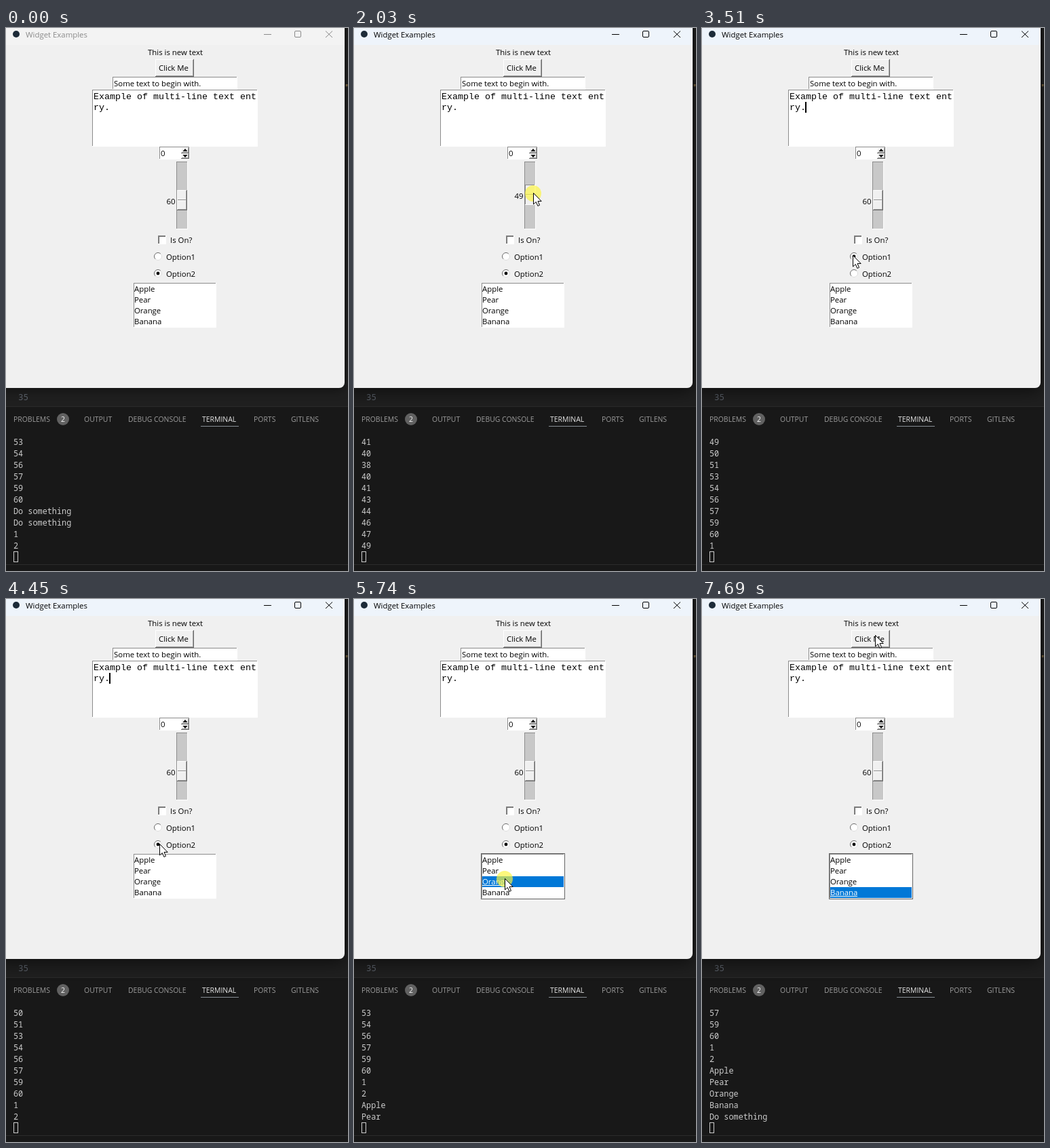
An HTML page with a canvas for the animation above (8 s loop, 504 by 801 pixels).

```html
<!DOCTYPE html>
<html lang="en">
<head>
<meta charset="utf-8">
<title>Widget Examples</title>
<style>
html, body { margin: 0; width: 504px; height: 801px; overflow: hidden; background: #181818; }
canvas { display: block; }
</style>
</head>
<body>
<canvas id="stage" width="504" height="801"></canvas>
<script>
const ctx = document.getElementById('stage').getContext('2d');
const LOOP = 8000;
const UI = '"Open Sans", "Noto Sans", sans-serif';
const MONO = '"Noto Sans Mono", monospace';
const COURIER = '"Liberation Mono", monospace';
const FRUIT = ['Apple', 'Pear', 'Orange', 'Banana'];

const T = { enter: 140, focus: 1100, caret: 1160, drop: 2640, opt1: 3340, opt2: 4320, button: 7560 };
const PICKS = [4870, 5320, 5740, 6070];

// [start, end] of each mouse press
const PRESSES = [[1040, T.drop], [3300, 3430], [T.opt2, 4440], [T.button, 7680],
  ...PICKS.map(p => [p, p + 80])];

// [time, x, y] of the pointer tip
const PATH = [
  [140, 453, 740], [400, 350, 440], [640, 217, 112], [880, 248, 222], [1090, 259, 250],
  [1160, 259, 247], [1500, 262, 235], [1720, 262, 235], [2030, 264, 243], [2570, 266, 250],
  [2700, 264, 252], [3300, 224, 335], [3510, 222, 335], [4190, 226, 354], [4320, 226, 354],
  [4660, 225, 372], [4800, 222, 378], [4940, 221, 382], [5260, 218, 398], [5600, 220, 405],
  [5740, 222, 412], [6070, 226, 427], [6480, 226, 427], [6560, 213, 438], [6900, 272, 230],
  [7230, 256, 55], [7290, 255, 53]
];

// slider travel in pixels above its lowest point
const DRAG = [[1100, 15], [1160, 12], [1500, 0], [1720, 0], [2030, 7], [2570, 15]];

const sliderValue = k => Math.round(38.4 + k * 100 / 69);

function track(keys, t, i = 1) {
  if (t <= keys[0][0]) return keys[0][i];
  for (let n = 1; n < keys.length; n++) {
    const a = keys[n - 1], b = keys[n];
    if (t <= b[0]) return a[i] + (b[i] - a[i]) * (t - a[0]) / (b[0] - a[0]);
  }
  return keys[keys.length - 1][i];
}

const log = ['53', '54', '56', '57', '59', '60', 'Do something', 'Do something', '1', '2']
  .map(s => [-1, s]);
log.push([1150, '59']);
for (let k = 13; k >= 0; k--) log.push([1230 + (13 - k) * 20, sliderValue(k)]);
for (let k = 1; k <= 15; k++) log.push([k <= 7 ? 1720 + 43 * k : 2030 + 67 * (k - 7), sliderValue(k)]);
log.push([T.opt1 + 20, '1'], [T.opt2 + 60, '2']);
PICKS.forEach((p, i) => log.push([p + 60, FRUIT[i]]));
log.push([7680, 'Do something']);

function rect(x, y, w, h, c) {
  ctx.fillStyle = c;
  ctx.fillRect(x, y, w, h);
}

function text(s, x, y, c = '#000', size = 11.4, face = UI, align = 'left') {
  ctx.font = size + 'px ' + face;
  ctx.textAlign = align;
  ctx.fillStyle = c;
  ctx.fillText(s, x, y);
}

function line(points, c, w = 1) {
  ctx.beginPath();
  points.forEach(([x, y]) => ctx.lineTo(x, y));
  ctx.strokeStyle = c;
  ctx.lineWidth = w;
  ctx.stroke();
}

function poly(points, c) {
  ctx.beginPath();
  points.forEach(([x, y]) => ctx.lineTo(x, y));
  ctx.closePath();
  ctx.fillStyle = c;
  ctx.fill();
}

function disc(x, y, r, c) {
  ctx.beginPath();
  ctx.arc(x, y, r, 0, Math.PI * 2);
  ctx.fillStyle = c;
  ctx.fill();
}

function bevel(x, y, w, h, light, dark, fill) {
  rect(x, y, w, h, dark);
  rect(x, y, w - 1, h - 1, light);
  rect(x + 1, y + 1, w - 2, h - 2, fill);
}

const sunken = (x, y, w, h, fill = '#fff') => bevel(x, y, w, h, '#8c8c8c', '#fff', fill);

function raised(x, y, w, h) {
  bevel(x, y, w, h, '#fff', '#696969', '#a0a0a0');
  rect(x + 1, y + 1, w - 3, h - 3, '#f0f0f0');
}

function editor() {
  rect(0, 0, 504, 801, '#181818');
  rect(0, 0, 504, 558, '#1f1f1f');
  text('"', 499, 92, '#c9a15a', 12.6, MONO);
  text('35', 18, 549, '#5b616a', 12.6, MONO);
  rect(0, 558, 504, 1, '#2b2b2b');
  rect(0, 791, 504, 1, '#2b2b2b');

  const tab = (s, x, c = '#9d9d9d') => text(s, x, 581, c, 10.45);
  tab('PROBLEMS', 11);
  disc(84, 577, 9, '#616161');
  text('2', 84, 581, '#f8f8f8', 10.5, UI, 'center');
  tab('OUTPUT', 115);
  tab('DEBUG CONSOLE', 180);
  tab('TERMINAL', 289, '#e7e7e7');
  rect(287, 587, 56, 1, '#868d94');
  tab('PORTS', 365);
  tab('GITLENS', 420);
}

function terminal(t) {
  const put = (s, row) => text(s, 11, 615 + row * 17, '#cccccc', 11.85, MONO);
  let shown = log.filter(e => e[0] <= t);
  // the first new line sits on the prompt row before the view scrolls
  const held = t >= 1150 && t < 1230;
  if (held) {
    put('59', 10);
    shown = shown.slice(0, -1);
  }
  shown.slice(-10).forEach((e, i) => put(e[1], i));
  ctx.strokeStyle = '#cccccc';
  ctx.lineWidth = 1;
  ctx.strokeRect(11.5, 772.5, 6, 15);
}

function frame(active) {
  ctx.save();
  ctx.shadowColor = active ? 'rgba(0,0,0,.6)' : 'rgba(0,0,0,.4)';
  ctx.shadowBlur = active ? 24 : 14;
  ctx.shadowOffsetY = 4;
  ctx.beginPath();
  ctx.roundRect(-20, -20, 519, 551, 8);
  ctx.fillStyle = '#f0f0f0';
  ctx.fill();
  ctx.restore();
  rect(0, 0, 499, 25, active ? '#eef4fb' : '#f3f3f3');
  disc(15, 9, 5, '#1d2b38');
  const ink = active ? '#000' : '#8a8a8a';
  text('Widget Examples', 29, 14, ink);
  rect(380, 9, 11, 1, ink);
  ctx.beginPath();
  ctx.roundRect(425.5, 4.5, 9, 9, 1.5);
  ctx.strokeStyle = ink;
  ctx.lineWidth = 1;
  ctx.stroke();
  line([[471, 4.5], [481, 14]], ink);
  line([[481, 4.5], [471, 14]], ink);
}

function radio(y, label, on) {
  disc(224, y, 6, '#fff');
  ctx.lineWidth = 1;
  ctx.beginPath();
  ctx.arc(224, y, 5.5, Math.PI * 0.75, Math.PI * 1.75);
  ctx.strokeStyle = '#696969';
  ctx.stroke();
  ctx.beginPath();
  ctx.arc(224, y, 5.5, -Math.PI * 0.25, Math.PI * 0.75);
  ctx.strokeStyle = '#dcdcdc';
  ctx.stroke();
  if (on) disc(224, y, 2.4, '#000');
  text(label, 236, y + 5);
}

function slider(t) {
  const k = Math.round(track(DRAG, t));
  const y = 224 + k;
  sunken(251, 197, 17, 100, '#c8c8c8');
  if (t >= T.focus && t < T.drop) {
    bevel(252, y, 15, 30, '#8c8c8c', '#fff', '#f0f0f0');
  } else {
    raised(252, y, 15, 30);
  }
  rect(253, y + 14, 12, 1, '#8c8c8c');
  rect(253, y + 15, 12, 1, '#fff');
  text(sliderValue(k), 249.5, y + 21, '#000', 11.4, UI, 'right');
}

function list(t) {
  const pick = PICKS.filter(p => t >= p).length - 1;
  if (pick >= 0) rect(187, 375, 124, 68, '#646464');
  sunken(188, 376, 122, 66);
  FRUIT.forEach((name, i) => {
    const y = 377 + i * 16, on = i === pick;
    if (on) rect(189, y, 120, 16, '#0078d7');
    text(name, 189, y + 12, on ? '#fff' : '#000');
    if (on) rect(189, y + 13, Math.round(ctx.measureText(name).width), 1, '#fff');
  });
}

function widgets(t) {
  text('This is new text', 209, 40);

  const down = t >= T.button && t < 7680 ? 1 : 0;
  if (down) sunken(220, 46, 57, 26, '#f0f0f0');
  else raised(220, 46, 57, 26);
  text('Click Me', 225 + down, 63 + down);

  sunken(157, 72, 184, 19);
  text('Some text to begin with.', 159, 86);

  sunken(127, 91, 244, 84);
  text('Example of multi-line text ent', 129, 105, '#000', 13.33, COURIER);
  text('ry.', 129, 121, '#000', 13.33, COURIER);
  if (t >= T.caret && t < 4600 && (t - T.caret) % 900 < 600) rect(152, 109, 2, 16, '#000');

  sunken(226, 175, 45, 19);
  text('0', 228, 189);
  raised(258, 176, 12, 9);
  raised(258, 185, 12, 8);
  poly([[264, 178], [267.5, 182], [260.5, 182]], '#000');
  poly([[264, 191], [267.5, 187], [260.5, 187]], '#000');

  slider(t);

  sunken(224, 306, 12, 13);
  rect(225, 307, 10, 1, '#696969');
  rect(225, 307, 1, 11, '#696969');
  text('Is On?', 242, 317);

  const first = t >= T.opt1 && t < T.opt2;
  radio(337, 'Option1', first);
  radio(362, 'Option2', !first);
  list(t);
}

function pointer(t) {
  if (t < T.enter) return;
  const x = Math.round(track(PATH, t, 1)), y = Math.round(track(PATH, t, 2));
  if (PRESSES.some(([a, b]) => t >= a && t < b)) disc(x, y + 1, 12, 'rgba(252,244,64,.68)');
  const shape = [[0, 0], [0, 16.5], [3.8, 13], [6.4, 19], [9, 17.8], [6.5, 12], [11.7, 12]]
    .map(([a, b]) => [x + a + 0.5, y + b + 0.5]);
  poly(shape, '#fff');
  line([...shape, shape[0]], '#000');
}

function draw(t) {
  const active = t >= T.focus;
  editor();
  terminal(t);
  frame(active);
  widgets(t);
  pointer(t);
}

const start = performance.now();
function tick() {
  draw((performance.now() - start) % LOOP);
  requestAnimationFrame(tick);
}
tick();
</script>
</body>
</html>
```
